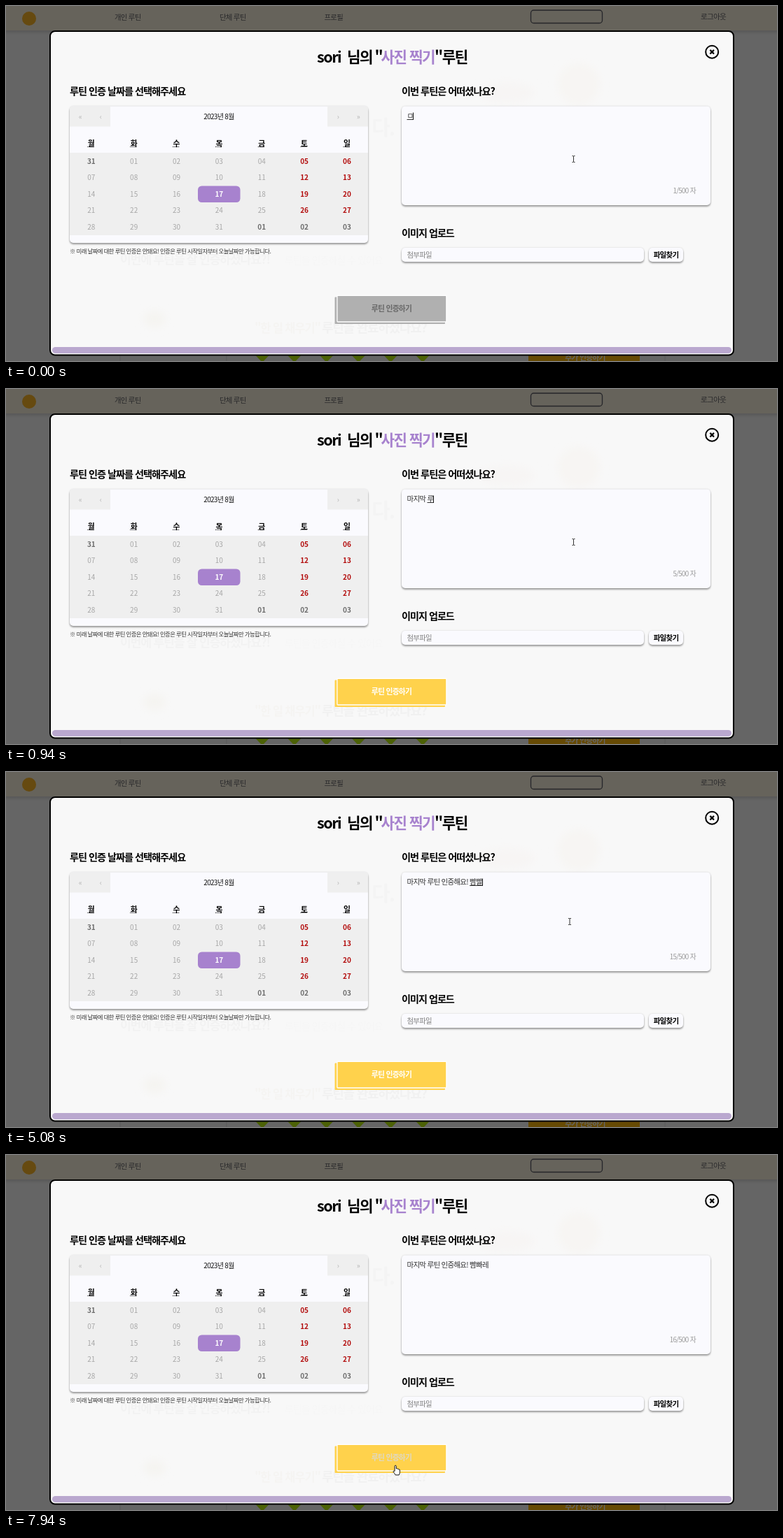
Recreate the animation shown at these times as an HTML page. Size 1101x508 px, loop 8000 ms.

```html
<!DOCTYPE html>
<html lang="ko">
<head>
<meta charset="utf-8">
<style>
html, body { margin: 0; width: 100%; height: 100%; overflow: hidden; background: #656565; }
svg { display: block; width: 1101px; height: 508px; }
text { font-family: "Noto Sans CJK KR", "Noto Sans CJK", "Noto Sans", sans-serif; letter-spacing: -.07em; white-space: pre; }
.b { font-weight: 700; }
.digits { letter-spacing: 0; }
.card { fill: #fafafe; filter: drop-shadow(0 2px 1px rgba(0,0,0,.33)) drop-shadow(0 0 1px rgba(0,0,0,.15)); }
</style>
</head>
<body>
<svg id="stage" viewBox="0 0 1101 508">
  <defs>
    <linearGradient id="navShade" x2="0" y2="1">
      <stop stop-color="#000" stop-opacity=".13"/><stop offset="1" stop-color="#000" stop-opacity="0"/>
    </linearGradient>
    <filter id="soft"><feGaussianBlur stdDeviation="6"/></filter>
    <clipPath id="calendarClip"><rect x="91" y="143" width="426" height="196" rx="5"/></clipPath>
  </defs>
  <g id="page">
    <rect width="1101" height="508" fill="#656565"/>
    <rect width="1101" height="35" fill="#66635b"/>
    <rect y="35" width="1101" height="6" fill="url(#navShade)"/>
    <circle cx="33" cy="18" r="10" fill="#664a10"/>
    <rect x="749.5" y="6" width="102" height="18.5" rx="4" fill="none" stroke="#26262a" stroke-width="1.3"/>
    <path d="M163 499v9M315 499v9M941 499v9" stroke="#5c5c5c"/>
    <rect x="746" y="490" width="159" height="18" fill="#664a04"/>
  </g>
  <rect x="63" y="36" width="976" height="463.5" rx="7" fill="#f8f8f8" stroke="#000" stroke-width="2"/>
  <rect x="66" y="488" width="970" height="9" rx="4.5" fill="#baa8cf"/>
  <g id="ghost">
    <g filter="url(#soft)">
      <ellipse cx="818" cy="112" rx="30" ry="30" fill="#f7f5f3"/>
      <ellipse cx="715" cy="124" rx="40" ry="15" fill="#f7f5f4"/>
      <ellipse cx="212" cy="448" rx="16" ry="12" fill="#f5f4f1"/>
    </g>
  </g>
  <g fill="none" stroke="#000" stroke-width="2">
    <circle cx="1008.2" cy="65.7" r="9"/><path d="M1005.4 62.9l5.6 5.6m0-5.6l-5.6 5.6" stroke-width="2.2"/>
  </g>
  <rect class="card" x="91" y="143.5" width="426" height="195.5" rx="5"/>
  <g id="calendar">
    <g clip-path="url(#calendarClip)" fill="#efefef">
      <path d="M91 143.5h58v29h-58zM459 143.5h58v29h-58zM91 210h426v118h-426z"/>
    </g>
    <rect x="274" y="257.5" width="60.5" height="23.5" rx="5.5" fill="#a782ce"/>
  </g>
  <rect class="card" x="565" y="143.5" width="441" height="141.5" rx="5"/>
  <rect class="card" x="565" y="346" width="346" height="20" rx="5"/>
  <rect class="card" x="918" y="346" width="49" height="20" rx="5"/>
  <g id="labels"></g>
  <g id="button">
    <rect id="back" x="469.5" y="416.5" width="157.5" height="38.5" rx="1"/>
    <rect id="front" x="472.9" y="414.4" width="156" height="37.6" rx="1" stroke="#fff" stroke-width="1.3"/>
  </g>
  <g id="entry">
    <path id="underline" stroke="#333" stroke-width="1"/>
    <path id="caret" stroke="#111" stroke-width="1"/>
  </g>
  <g id="cursor">
    <path id="beam" d="M-2-4.5h1.5l.5.5.5-.5h1.5M0-4v8M-2 4.5h1.5l.5-.5.5.5h1.5" fill="none" stroke="#333"/>
    <path id="arrow" d="M0 0v11l2.6-2.4 1.8 4 1.8-.8-1.8-3.9h3.6z" fill="#fff" stroke="#111" stroke-width=".8"/>
    <path id="hand" d="M-1.9 1.5v-7q0-1.3 1.1-1.3t1.1 1.3v3.4q1.5-.6 1.9.4 1.4-.5 1.7.6 1.5-.2 1.5 1.2v2.7q0 2-1.2 4.1h-5.1q-1-2.2-3.3-5 .8-1.6 2.3-.4z" fill="#fff" stroke="#111"/>
  </g>
</svg>
<script>
const LOOP = 8000;
const el = id => document.getElementById(id);

function label(parent, content, x, middle, size, fill, cls = '', anchor = 'start') {
  const node = document.createElementNS('http://www.w3.org/2000/svg', 'text');
  const attrs = { x, y: middle + size * .36, 'font-size': size, fill, class: cls, 'text-anchor': anchor };
  for (const name in attrs) node.setAttribute(name, attrs[name]);
  node.textContent = content;
  el(parent).append(node);
  return node;
}

// Page behind the dialog
label('page', '개인 루틴', 155, 16.5, 10.4, '#29292b');
label('page', '단체 루틴', 305, 16.5, 10.4, '#29292b');
label('page', '프로필', 454.5, 16.5, 10.4, '#29292b');
label('page', '로그아웃', 992, 15, 10.6, '#29292b');
label('page', '추가 인증하기', 827, 503, 10.8, '#666', 'b', 'middle');
for (let i = 0; i < 6; i++) {
  const gem = document.createElementNS('http://www.w3.org/2000/svg', 'path');
  gem.setAttribute('d', `M${355.5 + i * 45.8} 499h21l-10.5 11z`);
  gem.setAttribute('fill', '#4c6106');
  el('page').append(gem);
}
label('ghost', '다.', 522, 175, 29, '#f4f4f4', 'b');
label('ghost', '이번에 루틴을 잘 인증하셨나요?!', 163, 363, 17.2, '#f2f2f2', 'b');
label('ghost', '루틴을 인증하실 수 있어요', 398, 364, 14, '#f6f6f6');
label('ghost', '"한 일 채우기"', 355, 461, 16.5, '#f5f4f2', 'b');
label('ghost', '루틴을 완료하셨나요?', 451, 461, 18, '#f1f1f1', 'b');

// Dialog labels
label('labels', 'sori', 444, 73, 21.6, '#000', 'b');
label('labels', '님의', 487, 73, 21.2, '#000', 'b');
label('labels', '"', 526.5, 73, 21.2, '#000', 'b');
label('labels', '사진 찍기', 535.5, 73, 21.2, '#a782ce', 'b');
label('labels', '"루틴', 612, 73, 21.2, '#000', 'b');
label('labels', '루틴 인증 날짜를 선택해주세요', 91, 122, 14.15, '#000', 'b');
label('labels', '이번 루틴은 어떠셨나요?', 565, 122, 14.2, '#000', 'b');
label('labels', '이미지 업로드', 565, 325, 14.1, '#000', 'b');
label('labels', '※ 미래 날짜에 대한 루틴 인증은 안돼요! 인증은 루틴 시작일자부터 오늘날짜만 가능합니다.', 91, 351, 8.4, '#333');
label('labels', '첨부파일', 572.5, 356, 10.4, '#808080');
label('labels', '파일찾기', 942.5, 356, 10.5, '#000', 'b', 'middle');

// Calendar
const column = i => 121.4 + i * 60.86;
label('calendar', '2023년 8월', 304, 158, 10, '#111', '', 'middle');
['«', '‹', '›', '»'].forEach((sign, i) =>
  label('calendar', sign, [106, 135, 474, 503][i], 158, 10.5, '#b5b5b5', '', 'middle'));
[...'월화수목금토일'].forEach((day, i) => {
  const x = column(i);
  label('calendar', day, x, 197, 10.8, '#000', 'b', 'middle');
  el('calendar').insertAdjacentHTML('beforeend',
    `<path d="M${x - 5} 201.5h10" stroke="#000" stroke-dasharray="1 1"/>`);
});
for (let i = 0; i < 35; i++) {
  const date = i === 0 ? 31 : (i - 1) % 31 + 1;
  const outside = i === 0 || i > 31, weekend = i % 7 > 4, chosen = date === 17;
  const fill = chosen ? '#fff' : outside ? '#6c6c6c' : weekend ? '#b30d0d' : '#a6a6a6';
  label('calendar', String(date).padStart(2, '0'), column(i % 7) + .4, 222 + Math.floor(i / 7) * 23.55,
    10, fill, 'digits' + (outside || weekend || chosen ? ' b' : ''), 'middle');
}

// Moving parts
const typed = label('entry', '', 572.5, 157.5, 10.5, '#333');
const counter = label('entry', '', 985, 264, 9.8, '#999', '', 'end');
const action = label('button', '루틴 인증하기', 550.5, 433, 10.8, '#fff', 'b', 'middle');

// [time, committed text, word being composed]
const first = '마지막 ', second = '마지막 루틴 ', third = '마지막 루틴 인증해요!';
const typing = [
  [0, '', 'ㅁ'], [70, '', '마'], [270, '', '맞'], [340, '', '마지'], [470, '', '마짐'],
  [540, '', '마지마'], [610, '', '마지막'], [740, first, ''], [870, first, 'ㄹ'],
  [940, first, '루'], [1050, first, '뤁'], [1170, first, '루티'], [1280, first, '루틴'], [1390, second, ''],
  [1530, second, 'ㅇ'], [1640, second, '이'], [1740, second, '인'], [1850, second, '인ㅈ'],
  [1990, second, '인즈'], [2060, second, '인증'], [2120, second, '인증ㅎ'], [2190, second, '인증해'],
  [2260, second, '인증행'], [2390, second, '인증해요'], [2660, third, ''], [4020, third + ' ', ''],
  [4350, third + ' ', 'ㅃ'], [4420, third + ' ', '빠'], [4610, third + ' ', '빰'], [4810, third + ' ', '빰ㅃ'],
  [4950, third + ' ', '빰빠'], [5050, third + ' ', '빰빨'], [5150, third + ' ', '빰빠레'], [6550, third + ' 빰빠레', '']
];

// [time, x, y, shape]
const pointer = [
  [0, 810.5, 219, 'beam'], [3420, 805, 214, 'beam'], [7080, 806, 235, 'beam'],
  [7480, 770, 320, 'arrow'], [7560, 700, 410, 'arrow'], [7630, 645, 465, 'arrow'], [7710, 602, 484, 'arrow'],
  [7790, 575, 468, 'arrow'], [7870, 560, 455, 'arrow'], [7940, 557, 451, 'hand']
];

const latest = (list, t) => list.findLast(item => item[0] <= t);
const mix = (a, b, k) => `rgb(${a.map((v, i) => Math.round(v + (b[i] - v) * k))})`;
const ease = (t, start, length) => {
  const k = Math.min(1, Math.max(0, (t - start) / length));
  return 1 - (1 - k) ** 2;
};

function draw(t) {
  const [, done, word] = latest(typing, t);
  const content = done + word;
  if (typed.textContent !== content) typed.textContent = content;
  counter.textContent = `${content.length}/500 자`;
  const start = 572.5 + (done ? typed.getSubStringLength(0, done.length) : 0);
  const end = 572.5 + typed.getSubStringLength(0, content.length);
  el('underline').setAttribute('d', word ? `M${start} 162.5H${end}` : '');
  const caretOff = t >= 3220 && t < 3750 || t >= 5630 && t < 6150 || t >= 6550;
  el('caret').setAttribute('d', caretOff ? '' : `M${Math.round(end) + .5} 152.5v10.5`);

  const enabled = ease(t, 60, 310);
  const fill = mix([176, 176, 176], [255, 210, 76], enabled);
  el('back').setAttribute('fill', fill);
  el('front').setAttribute('fill', fill);
  action.setAttribute('fill', t < 7870
    ? mix([105, 105, 105], [255, 255, 255], enabled)
    : mix([255, 255, 255], [222, 216, 196], ease(t, 7870, 70)));

  const [, x, y, shape] = latest(pointer, t);
  el('cursor').setAttribute('transform', `translate(${x} ${y})`);
  for (const id of ['beam', 'arrow', 'hand']) el(id).style.display = id === shape ? '' : 'none';
}

function tick() {
  draw(performance.now() % LOOP);
  requestAnimationFrame(tick);
}
tick();
</script>
</body>
</html>
```
